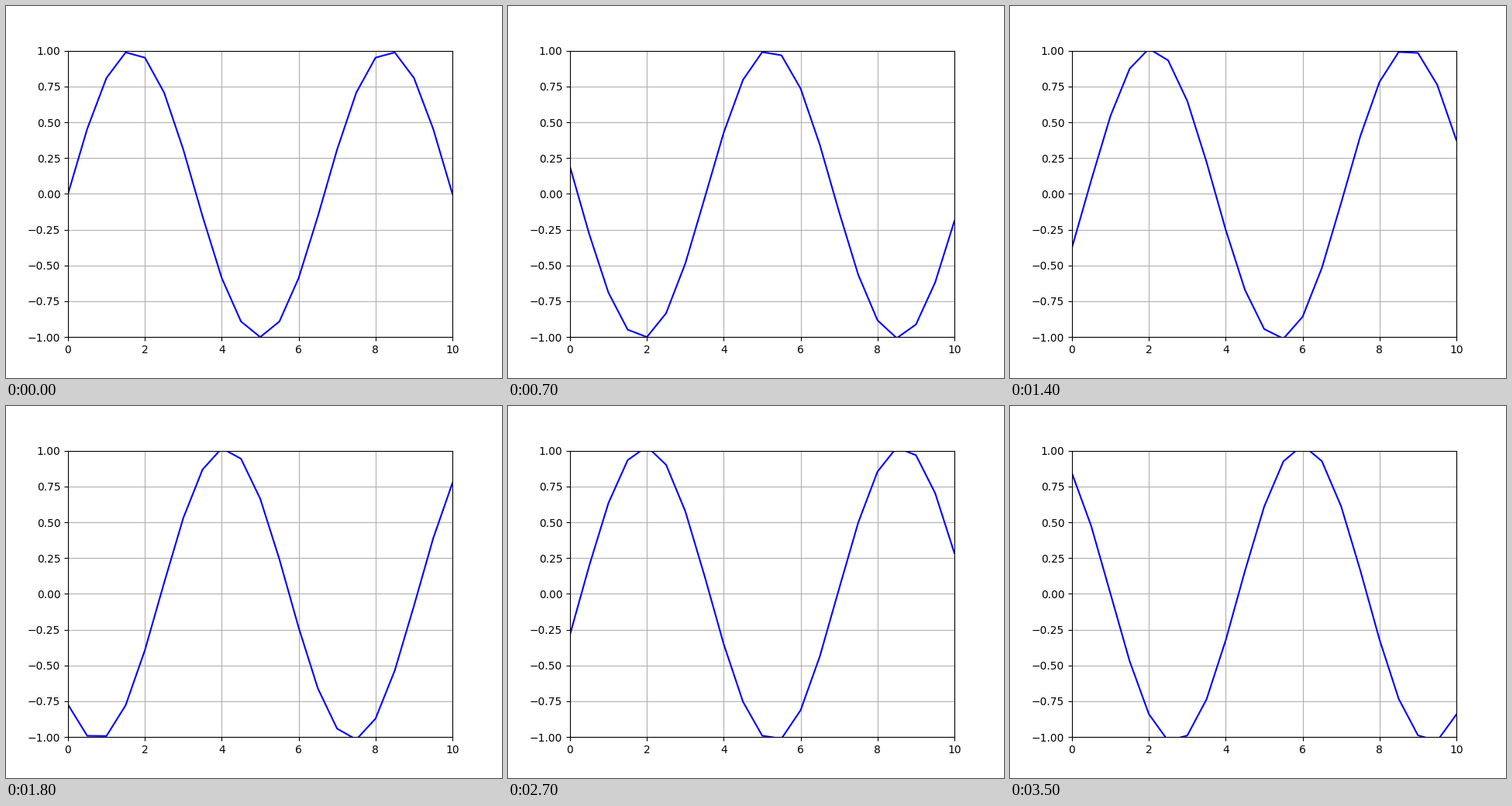
Recreate the animation shown at these times as a matplotlib script. Size 640 px wide and 480 px high, loop 3.6 s.

```python
import numpy as np
import matplotlib.pyplot as plt
from matplotlib.animation import FuncAnimation

FRAMES = 36
INTERVAL = 100  # ms
DX = 0.5
CFL = 1.01      # slightly above 1, so the wave slowly grows
K = 0.3 * np.pi

x = np.arange(0, 10 + DX / 2, DX)
# Factor applied to the wave by one upwind step of the advection equation
gain = 1 - CFL * (1 - np.exp(-1j * K * DX))

fig, ax = plt.subplots(figsize=(6.4, 4.8), dpi=100)
ax.set_xlim(0, 10)
ax.set_ylim(-1, 1)
ax.grid()
line, = ax.plot([], [], "b-", lw=1.5)


def update(step):
    line.set_data(x, (gain ** step * np.exp(1j * K * x)).imag)
    return line,


anim = FuncAnimation(fig, update, frames=FRAMES, interval=INTERVAL,
                     repeat=True, repeat_delay=0)
plt.show()
```
